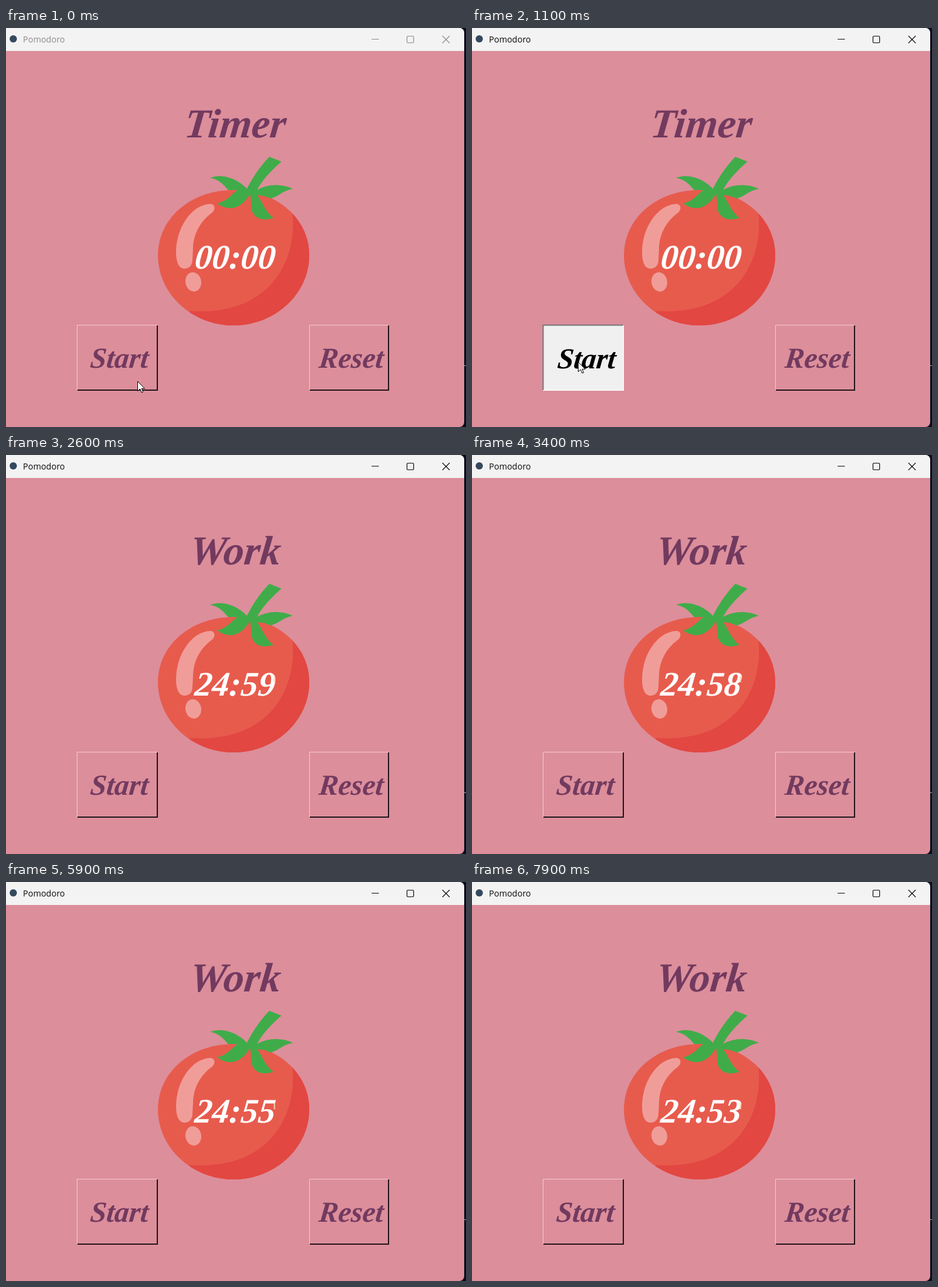
Write an HTML page that moves like this. It is 760x660 px and loops after 8 s.

```html
<!DOCTYPE html>
<html lang="en">
<head>
<meta charset="utf-8">
<title>Pomodoro</title>
<style>
  html, body { margin: 0; width: 100%; height: 100%; overflow: hidden; background: #0b0b1e; }
  svg { display: block; }
  .script text { font: italic bold 48px "Liberation Serif", serif; fill: #723a5f; text-anchor: middle; }
  .script .heading { font-size: 68px; }
  .script .clock { font-size: 57px; fill: #fff; }
  .caption { font: 14px "Open Sans", "Noto Sans", sans-serif; }
  .light { fill: none; stroke: #f6cbd1; }
  .dark { fill: none; stroke: #24151b; stroke-width: 2; }
  .pressed .face { fill: #f0f0f0; }
  .pressed .light { stroke: #77777a; stroke-width: 2; }
  .pressed .dark { stroke: #fff; stroke-width: 1; }
  .pressed text { fill: #000; }
</style>
</head>
<body>
<svg width="760" height="660" viewBox="0 0 760 660">
  <defs>
    <path id="body" d="M376 268C305 268 251 315 251 376C251 440 308 492 376 492S501 440 501 376C501 315 447 268 376 268Z"/>
    <clipPath id="inside"><use href="#body"/></clipPath>
    <clipPath id="window"><rect x="-10" width="767" height="660" rx="8"/></clipPath>
  </defs>

  <g clip-path="url(#window)">
    <rect width="757" height="660" fill="#dc8e9b"/>
    <rect width="757" height="38" fill="#f3f3f3"/>
  </g>
  <path d="M757 558.5h3" stroke="#aaa"/>
  <circle cx="12" cy="18" r="6" fill="#34495e"/>
  <g id="bar">
    <text class="caption" x="28" y="24" fill="currentColor">Pomodoro</text>
    <g fill="none" stroke="currentColor" stroke-width="1.2">
      <path d="M604 18.5h12M721 13l12 12M733 13l-12 12"/>
      <rect x="662.5" y="13.5" width="11" height="11" rx="1.5"/>
    </g>
  </g>

  <use href="#body" fill="#e75b4d"/>
  <path clip-path="url(#inside)" fill="#e24742" d="M473 305C482 380 440 478 303 468L303 500H510V305Z"/>
  <g fill="#f09d99">
    <path d="M337 291C345 291 347 299 341 305C322 319 309 340 309 366L308 384C308 392 303 398 295 398C286 398 281 388 281 371C281 332 305 293 337 291Z"/>
    <ellipse rx="13" ry="16" transform="translate(309.5 420) rotate(-10)"/>
  </g>
  <path fill="#3fac49" d="M435 213L455 221C437 237 422 253 415 268C432 258 455 257 474 266C457 269 450 279 437 282C430 279 423 276 415 277C424 287 427 303 442 314C425 320 405 316 405 292C405 284 404 278 403 274C395 290 375 309 349 290C364 287 371 277 382 268H367C360 260 352 250 337 248C357 240 382 249 398 266C408 246 420 229 435 213Z"/>

  <g class="script">
    <g transform="translate(377 181) skewX(-6)"><text id="heading" class="heading"></text></g>
    <g transform="translate(377 398) skewX(-6)"><text id="clock" class="clock"></text></g>
    <g id="start" transform="translate(117 491)">
      <rect class="face" width="134" height="109" fill="none"/>
      <path class="light" d="M.5 108V.5H133"/>
      <path class="dark" d="M133 1V108H1"/>
      <g id="label"><text transform="translate(69 71) skewX(-6)">Start</text></g>
    </g>
    <g transform="translate(501 491)">
      <path class="light" d="M.5 108V.5H131"/>
      <path class="dark" d="M131 1V108H1"/>
      <text transform="translate(68 71) skewX(-6)">Reset</text>
    </g>
  </g>
  <path id="residue" d="M443.5 366v10" stroke="#f5d3b0" stroke-width="2"/>
  <path id="cursor" d="M0 0V16L4 12.5L6.5 18.5L9 17.5L6.5 11.8H11.5Z" fill="#fff" stroke="#000"/>
</svg>

<script>
const LOOP = 8000, STEP = 100, PRESS = 900, RELEASE = 1200, TICK = 880;
const el = id => document.getElementById(id);
const clamp = x => Math.min(1, Math.max(0, x));

// time, x, y of the pointer
const trail = [[0, 217, 584], [300, 217, 584], [900, 175, 552], [1300, 175, 552], [1800, 556, 423], [2200, 775, 370]];

function pointer(t) {
  const i = trail.findIndex(p => p[0] > t);
  if (i < 0) return trail.at(-1).slice(1);
  const [a, b] = [trail[i - 1], trail[i]];
  const k = (t - a[0]) / (b[0] - a[0]);
  return [1, 2].map(n => a[n] + (b[n] - a[n]) * k);
}

function draw(t) {
  const running = t >= RELEASE;
  const pressed = t >= PRESS && !running;
  const left = running ? 1500 - Math.floor((t - RELEASE) / TICK) : 0;
  const two = n => String(n).padStart(2, "0");

  el("heading").textContent = running ? "Work" : "Timer";
  el("clock").textContent = two(Math.floor(left / 60)) + ":" + two(left % 60);
  el("residue").setAttribute("visibility", running && left < 1500 ? "visible" : "hidden");

  const grey = Math.round(140 - 130 * clamp((t - PRESS + STEP) / 200));
  el("bar").style.color = `rgb(${grey},${grey},${grey})`;
  el("start").classList.toggle("pressed", pressed);
  el("label").setAttribute("transform", pressed ? "translate(2 1)" : "");
  el("cursor").setAttribute("transform", `translate(${pointer(t).map(v => Math.round(v) + 0.5)})`);
}

const begin = performance.now();
function frame() {
  const t = (performance.now() - begin) % LOOP;
  draw(Math.floor(t / STEP) * STEP);
  requestAnimationFrame(frame);
}
frame();
</script>
</body>
</html>
```
